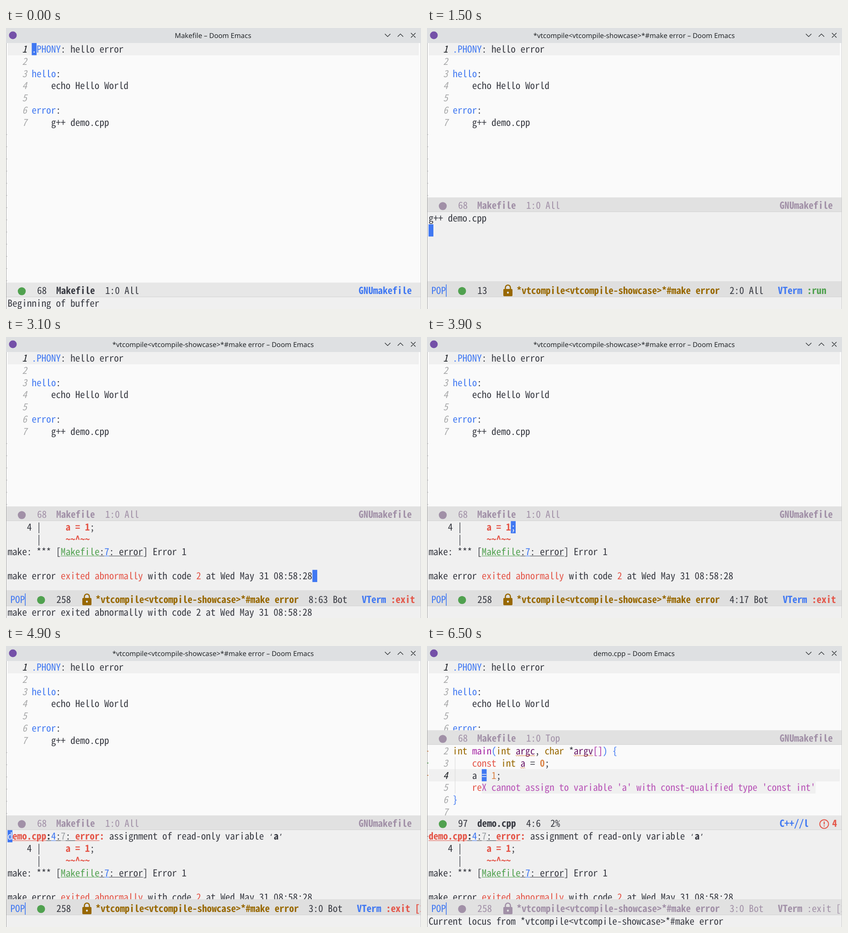
Animation, 908 px wide and 617 px high, one loop 6.9 s. Source, as an HTML page:

```html
<!DOCTYPE html>
<html lang="en">
<head>
<meta charset="utf-8">
<title>Compiling in an editor</title>
<style>
  html, body { margin: 0; width: 100%; height: 100%; overflow: hidden; background: #fafafa; }
  svg { display: block; width: 908px; height: 617px; }
  text {
    font-family: "Noto Sans Mono CJK JP", "Noto Sans Mono CJK SC", "Noto Sans Mono", monospace;
    font-size: var(--mono, 17.6px);
    font-kerning: none;
    font-variant-ligatures: none;
    text-rendering: geometricPrecision;
    white-space: pre;
  }
  .title { font-family: "Noto Sans", sans-serif; font-size: 15px; text-anchor: middle; fill: #232629; }
  .fg { fill: #383a42; }
  .blue { fill: #4078f2; }
  .red { fill: #e45649; }
  .green { fill: #50a14f; }
  .yellow { fill: #986801; }
  .orange { fill: #da8548; }
  .magenta { fill: #a626a4; }
  .violet { fill: #b751b6; }
  .plum { fill: #6a1868; }
  .gray { fill: #9ca0a4; }
  .muted { fill: #a190a7; }
  .pale { fill: #f4f4f4; }
  .b { font-weight: 700; }
  .num { fill: #a9aaab; font-style: italic; }
  .now { fill: #202328; font-style: italic; }
  .quote { font-family: "Noto Sans Mono", "DejaVu Sans Mono", monospace; font-size: 17.6px; }
  .wave { fill: none; stroke: #da8548; stroke-width: 1; }
  .icon { fill: none; stroke: #232629; stroke-width: 1.2; }
</style>
</head>
<body>
<svg id="stage" viewBox="0 0 908 617"></svg>
<script>
const LOOP = 6900, CELL = 10.587, ROW = 26.75, ASCENT = 21;
const LEFT = 3.4, CODE = LEFT + 5 * CELL;
const MAIN = 33, MID = 217, POPUP = 404.3, ECHO = 591;

const escape = s => s.replace(/&/g, '&amp;').replace(/</g, '&lt;');
const box = (x, y, w, h, fill) => `<rect x="${x}" y="${y}" width="${w}" height="${h}" fill="${fill}"/>`;
const dot = (x, y, r, cls) => `<circle cx="${x}" cy="${y}" r="${r}" class="${cls}"/>`;
const during = (from, to, content) => `<g data-from="${from}" data-to="${to}">${content}</g>`;

function wave(x, y, w) {
  let d = `M${x} ${y}`;
  for (let i = 1; i * 2 <= w; i++) d += `L${x + i * 2} ${y + (i % 2 ? 2.5 : 0)}`;
  return `<path class="wave" d="${d}"/>`;
}

// Text on the character grid; «classes|text» marks a styled run.
function line(x, y, source, base = 'fg') {
  let col = 0, out = '';
  for (const [, cls, marked, plain] of source.matchAll(/«(.*?)\|(.*?)»|([^«]+)/g)) {
    const s = marked ?? plain, names = cls ?? base;
    const px = x + col * CELL, w = s.length * CELL;
    out += `<text x="${px}" y="${y}" class="${names}">${escape(s)}</text>`;
    if (/\bu\b/.test(names)) out += `<rect x="${px}" y="${y + 1.6}" width="${w}" height="1" class="${names}"/>`;
    if (/\bwavy\b/.test(names)) out += wave(px, y + 1.5, w);
    col += s.length;
  }
  return out;
}

const lines = (x, top, list) => list.map((s, i) => line(x, top + i * ROW + ASCENT, s)).join('');

const numbers = (top, first, last, current) => {
  let out = '';
  for (let n = first; n <= last; n++)
    out += line(CODE - 2 * CELL, top + (n - first) * ROW + ASCENT, String(n), n === current ? 'now' : 'num');
  return out;
};

const cursor = (x, top, row, col, char = '') =>
  box(x + col * CELL, top + row * ROW, CELL, ROW, '#4078f2') +
  line(x + col * CELL, top + row * ROW + ASCENT, char, 'pale');

const bar = (y, bottom, fill) => box(0, y, 908, bottom - y, fill) + box(0, bottom - 1, 908, 1, '#d3d3d3');

function fileBar(y, active, size, name, place, right = '') {
  const fg = active ? 'fg' : 'muted', base = y + 25;
  return bar(y, y + 32, active ? '#e7e7e7' : '#e1e1e1') +
    dot(34.5, y + 19, 8.7, active ? 'green' : 'muted') +
    line(68, base, size, fg) + line(110, base, name, fg + ' b') + line(217, base, place, fg) + right;
}

const makeBar = (y, active, place) => fileBar(y, active, '68', 'Makefile', place,
  line(771.5, y + 25, 'GNUmakefile', (active ? 'blue' : 'muted') + ' b'));

function popupBar(size, place, status = '«red b|:exit [2]»', active = true) {
  const tone = c => active ? c : 'muted', fill = active ? '#dfdfdf' : '#e1e1e1';
  const lock = active ? '#986801' : '#a190a7';
  return bar(556, ECHO, fill) +
    line(9.5, 584, 'POP', 'blue') + box(41.3, 563, 1.6, 27, '#4078f2') +
    dot(76.7, 577.5, 8.7, tone('green')) + line(110.3, 584, size, tone('fg')) +
    `<path d="M171.5 574v-4a5.5 5.5 0 0 1 11 0v4" fill="none" stroke="${lock}" stroke-width="2.6"/>` +
    `<rect x="167" y="573" width="20" height="16" rx="2" fill="${lock}"/>` +
    `<circle cx="177" cy="581" r="2.2" fill="${fill}"/>` +
    line(196.3, 584, '*vtcompile<vtcompile-showcase>*#make error', tone('yellow') + ' b') +
    line(662, 584, place, tone('fg')) +
    line(662 + (place.length + 3) * CELL, 584, `«${tone('blue')} b|VTerm» ${status}`, tone('fg'));
}

const popup = list => box(0, 404, 908, 152, '#f0f0f0') + lines(LEFT, POPUP, list);
const echo = (from, to, s) => during(from, to, line(LEFT, 612.3, s));
const title = (from, to, s) =>
  during(from, to, `<text x="453" y="21.5" class="title">${escape(s)} – Doom Emacs</text>`);

const makefile = [
  '«blue|.PHONY»: hello error', '', '«blue|hello»:', '    echo Hello World', '',
  '«blue|error»:', '    g++ demo.cpp'
];

const report = [
  '«red b u|demo.cpp»«fg b u|:»«blue u|4»«fg u|:»«gray u|7»«fg u|: »«red b u|error»«red b|:»' +
    ' assignment of read-only variable «fg quote|‘»«fg b|a»«fg quote|’»',
  '    4 |     «red b|a = 1»;',
  '      |     «red b|~~^~~»',
  'make: *** [«green u|Makefile»«fg u|:»«blue u|7»«fg u|: error»] Error 1'
];
const exited = 'make error «red|exited abnormally» with code «red|2» at Wed May 31 08:58:28';

const ticks = Array.from({ length: 13 }, (_, i) => box(0, 233.5 + i * ROW, 3, 1, '#b9b9b9')).join('');

const mainWindow = box(0, MAIN, 908, 584, '#fafafa') + box(4, MAIN, 899, 27, '#f0f0f0') + ticks +
  numbers(MAIN, 1, 7, 1) + lines(CODE, MAIN, makefile);

function demoWindow() {
  const signature = w => `«yellow|int» «magenta|main»«blue|(»«yellow|int» «plum ${w}|argc», ` +
    `«yellow|char» *«plum ${w}|argv»«magenta|[]»«blue|)» «blue|{»`;
  const constant = w => `    «red|const» «yellow|int» «plum ${w}|a» = «orange b|0»;`;
  const at = n => MID + n * ROW;
  const head = w => lines(CODE, MID, [signature(w), constant(w)]);
  return box(0, MID, 908, 156, '#fafafa') + box(4, at(2), 899, ROW, '#f0f0f0') +
    box(61, at(1), 1, 3 * ROW, '#dadada') + numbers(MID, 2, 7, 4) +
    during(5400, 5900, box(CODE + 6 * CELL, at(2), 4 * CELL, ROW, '#c9c9c9')) +
    lines(CODE, at(2), ['    a = «orange|1»;', '    «red|re»', '«blue|}»']) +
    cursor(CODE, MID, 2, 6, '=') +
    during(5400, 5500, head('') + line(CODE + 6 * CELL, at(3) + ASCENT, '«red|turn» «orange|0»;')) +
    during(5500, LOOP, head('wavy') +
      box(CODE + 6 * CELL, at(3), 69 * CELL, ROW, '#f0f0f0') +
      line(CODE + 6 * CELL, at(3) + ASCENT,
        "X cannot assign to variable 'a' with const-qualified type 'const int'", 'violet') +
      box(0, 230, 3, 2, '#da8548') + box(0, 256, 3, 2, '#50a14f') + box(0, 283, 3, 2, '#da8548'));
}

const alert = (x, color) =>
  `<circle cx="${x}" cy="391" r="9.6" fill="none" stroke="${color}" stroke-width="2"/>` +
  box(x - 1.1, 385.5, 2.2, 6.5, color) + box(x - 1.1, 394, 2.2, 2.3, color);

const mode = x => line(x, 397, 'C++//l', 'blue b');

const popupCursor = (from, to, size, place, row, col, char) =>
  during(from, to, cursor(LEFT, POPUP, row, col, char) + popupBar(size, place));

const chrome = box(0, 0, 908, 33, '#dee0e2') + '<circle cx="15" cy="16" r="8.5" fill="#7450a8"/>' +
  '<path class="icon" d="M829 13l6 6 6-6M857 19l6-6 6 6M886 11l10 10M896 11l-10 10"/>';

document.getElementById('stage').innerHTML = [
  mainWindow,
  during(0, 900, cursor(CODE, MAIN, 0, 0, '.')),
  during(0, 1500, makeBar(559, true, '1:0 All')),
  during(1500, 5400, makeBar(372, false, '1:0 All')),

  during(5400, LOOP, makeBar(185, false, '1:0 Top') + demoWindow() +
    fileBar(372, true, '97', 'demo.cpp', '4:6  2%')),
  during(5400, 6400, mode(824.5)),
  during(6400, 6500, mode(792.5) + alert(878, '#9ca0a4')),
  during(6500, LOOP, mode(771.5) + alert(869, '#e45649') + line(886.5, 397, '4', 'red b')),

  during(1500, 1600, popup(['g++ demo.cpp']) + cursor(LEFT, POPUP, 1, 0) +
    popupBar('13 ', '2:0 All', '«green b|:run»')),
  during(1600, 3100, popup(report)),
  during(3100, 4100, popup([...report.slice(1), '', exited])),
  during(4100, LOOP, popup([...report, '', exited])),
  popupCursor(1600, 3100, '194', '7:0 Bot', 4, 0),
  popupCursor(3100, 3500, '258', '8:63 Bot', 4, 63),
  popupCursor(3500, 3600, '258', '7:0 Bot', 3, 0),
  popupCursor(3600, 3800, '258', '6:36 Bot', 2, 36, '1'),
  popupCursor(3800, 3900, '258', '5:16 Bot', 1, 16, '~'),
  popupCursor(3900, 4100, '258', '4:17 Bot', 0, 17, ';'),
  popupCursor(4100, 4900, '258', '3:17 Bot', 0, 17, 'o'),
  popupCursor(4900, 5400, '258', '3:0 Bot', 0, 0, 'd'),
  during(5400, LOOP, box(0, 417, 3, 2, '#b9a0a0') + popupBar('258', '3:0 Bot', ':exit [2]', false)),

  box(0, ECHO, 908, 26, '#f0f0f0'),
  echo(0, 500, 'Beginning of buffer'),
  echo(500, 700, 'SPC-'),
  echo(700, 900, 'SPC c-'),
  during(900, 1500, line(LEFT, 612.3, '«blue|Compile command:» make error') + cursor(LEFT, ECHO, 0, 27)),
  echo(1600, 3500, 'make error exited abnormally with code 2 at Wed May 31 08:58:28'),
  echo(5400, LOOP, 'Current locus from *vtcompile<vtcompile-showcase>*#make error'),

  chrome,
  title(0, 900, 'Makefile'),
  title(900, 1500, '*Minibuf-1*'),
  title(1500, 5400, '*vtcompile<vtcompile-showcase>*#make error'),
  title(5400, LOOP, 'demo.cpp'),
  box(0, 33, 1, 584, '#a6a6a6'), box(907, 33, 1, 584, '#cfcfcf')
].join('');

// Choose the font size whose advance equals one grid cell.
const pen = document.createElement('canvas').getContext('2d');
pen.font = '100px ' + getComputedStyle(document.querySelector('text.fg')).fontFamily;
document.documentElement.style.setProperty('--mono', CELL * 100 / pen.measureText('0').width + 'px');

const parts = [...document.querySelectorAll('[data-from]')];
function draw() {
  const t = performance.now() % LOOP;
  for (const g of parts)
    g.style.display = t >= +g.dataset.from && t < +g.dataset.to ? '' : 'none';
  requestAnimationFrame(draw);
}
draw();
</script>
</body>
</html>
```
